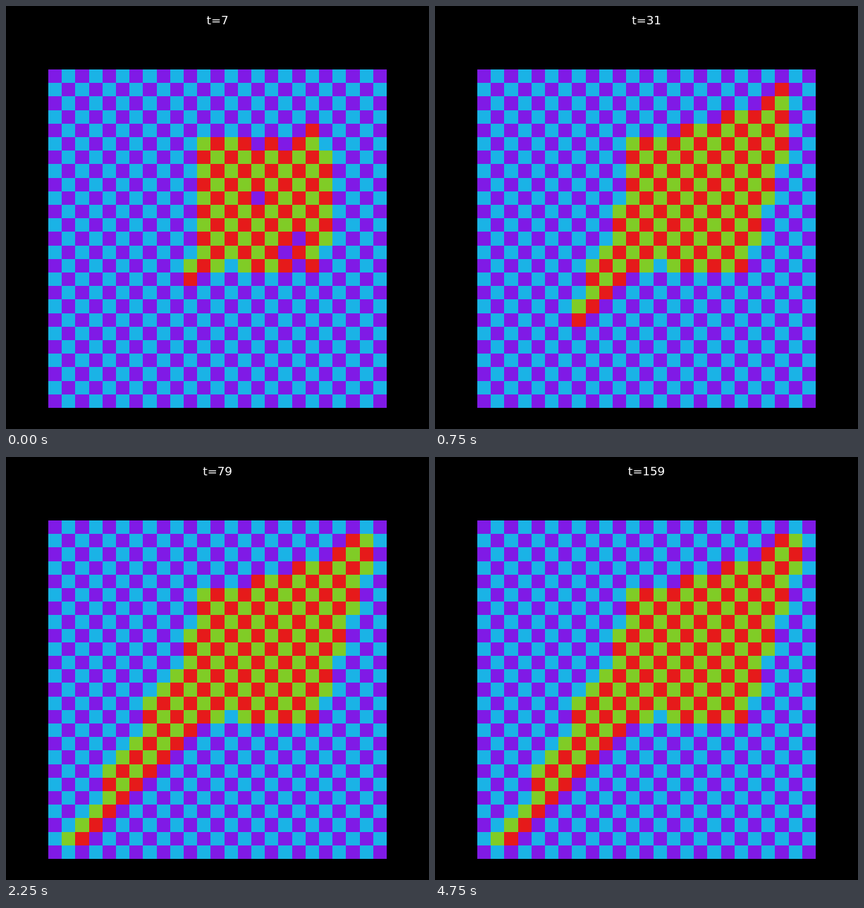
Recreate the animation shown at these times as an HTML page with a canvas. Size 600x600 px, loop 5000 ms.

```html
<!DOCTYPE html>
<html lang="en">
<head>
<meta charset="utf-8">
<title>Growing domain on a checkerboard</title>
<style>
  html, body { margin: 0; width: 100%; height: 100%; overflow: hidden; background: #000; }
  canvas { display: block; width: 600px; height: 600px; }
</style>
</head>
<body>
<canvas id="stage" width="600" height="600"></canvas>
<script>
const SIZE = 25, CELL = 19.2, LEFT = 60, TOP = 90;
const STAGES = 20, STAGE_MS = 250, TICKS = 8;
const OFF = ['#801ae6', '#1ab3e6'];
const ON = ['#80cc26', '#e61a1a'];

const ctx = document.getElementById('stage').getContext('2d');
const edge = (start, i) => Math.round(start + i * CELL);

// birth[row][col] is the stage at which a cell switches on
const birth = Array.from({ length: SIZE }, () => Array(SIZE).fill(Infinity));

function grow(stage, col, top, bottom = top) {
  for (let row = top; row <= bottom; row++) birth[row][col] = stage;
}

// Initial block and the cells that stay off or join it later
for (let col = 11; col <= 19; col++) grow(0, col, 5, 14);
grow(0, 19, 4);
grow(0, 20, 6, 12);
grow(Infinity, 13, 14);
grow(1, 15, 4, 5);
grow(1, 15, 9);
grow(1, 17, 4, 5);
grow(1, 17, 13);
grow(1, 18, 12);
grow(1, 18, 14);

// Upper right: one more column per stage
grow(1, 20, 3, 5);
grow(2, 21, 2, 9);
grow(3, 22, 1, 6);
grow(4, 23, 1, 3);
grow(2, 16, 4);
grow(2, 18, 3, 4);
grow(3, 19, 3);

// Lower left: three diagonal fronts, one column per stage
for (let s = 0; s <= 9; s++) grow(s, 10 - s, 14 + s, Math.min(15 + s, 23));
for (let s = 2; s <= 7; s++) grow(s, 11 - s, 11 + s, 12 + s);
for (let s = 4; s <= 6; s++) grow(s, 13 - s, 7 + s, 8 + s);
grow(1, 10, 10, 13);
grow(4, 10, 8, 9);

function draw(stage) {
  ctx.fillStyle = '#000';
  ctx.fillRect(0, 0, 600, 600);
  for (let row = 0; row < SIZE; row++) {
    const y = edge(TOP, row), height = edge(TOP, row + 1) - y;
    for (let col = 0; col < SIZE; col++) {
      const x = edge(LEFT, col);
      const palette = birth[row][col] <= stage ? ON : OFF;
      ctx.fillStyle = palette[(row + col) % 2];
      ctx.fillRect(x, y, edge(LEFT, col + 1) - x, height);
    }
  }
  ctx.fillStyle = '#fff';
  ctx.font = '16.667px "DejaVu Sans", sans-serif';
  ctx.textAlign = 'center';
  ctx.fillText('t=' + (stage * TICKS + TICKS - 1), 300, 26);
}

let start;
function frame() {
  const now = performance.now();
  start ??= now;
  draw(Math.floor((now - start) / STAGE_MS) % STAGES);
  requestAnimationFrame(frame);
}
frame();
</script>
</body>
</html>
```
